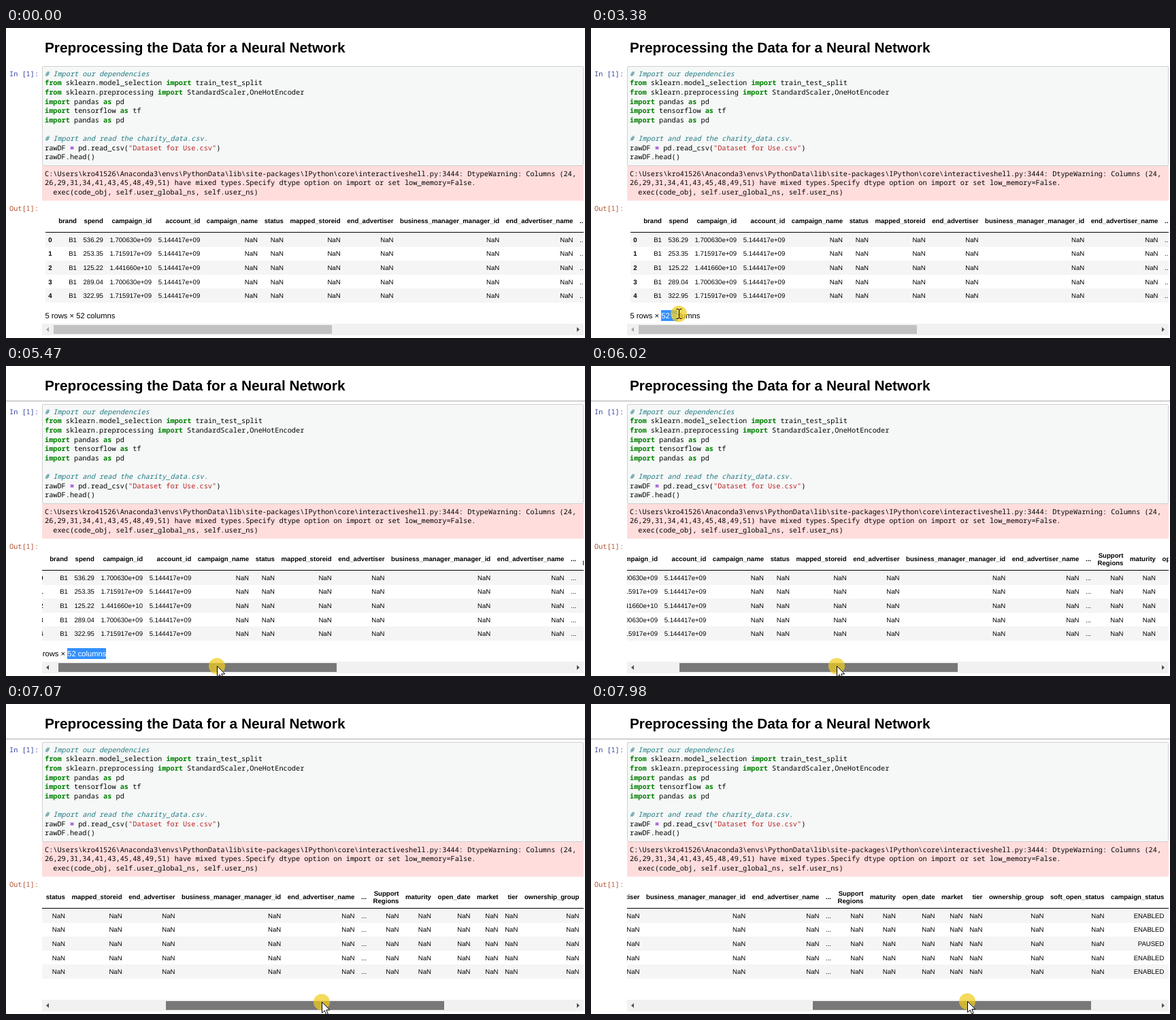
Write an HTML page that moves like this. It is 851 by 456 pixels and loops after 8 s.

```html
<!DOCTYPE html>
<html lang="en">
<head>
<meta charset="utf-8">
<title>Notebook</title>
<style>
@property --x { syntax: "<integer>"; inherits: true; initial-value: 545; }
@property --y { syntax: "<integer>"; inherits: true; initial-value: 450; }
@property --scroll { syntax: "<integer>"; inherits: true; initial-value: 0; }
@property --sel { syntax: "<integer>"; inherits: true; initial-value: 0; }

html, body { margin: 0; width: 100%; height: 100%; overflow: hidden; background: #fff; }
#stage {
  position: relative; width: 851px; height: 456px; overflow: hidden; background: #fff; color: #000;
  font-family: "Liberation Sans", Arial, sans-serif; text-rendering: geometricPrecision;
  animation: roam 8s step-end infinite, pick 8s step-end infinite;
}
#stage > *, #bar > *, #page > * { position: absolute; }
h1 { left: 57px; top: 18px; margin: 0; font-size: 20.8px; line-height: 23px; white-space: nowrap; }
pre { margin: 0; font: 10.263px/13.6px "Noto Sans Mono", "DejaVu Sans Mono", monospace; }
#rule { left: 0; top: 51px; width: 851px; height: 1px; background: #ababab; animation: rule 8s step-end infinite; }

.prompt { left: 5px; }
.in { top: 61.8px; color: #303f9f; }
.out { top: 260px; color: #b5502d; }
#code, #warn { left: 53px; width: 796px; box-sizing: border-box; }
#code { top: 56px; height: 147px; padding: 4.8px 3px; border: 1px solid #cfcfcf; border-radius: 2px; background: #f6f8f8; }
#code i { color: #217a80; }
#code b { color: #008000; }
#code s { color: #ba2121; text-decoration: none; }
#code u { color: #7800c2; font-weight: 700; text-decoration: none; }
#warn { top: 203px; height: 51px; padding: 5.8px 4px 0; background: #fdd; }

#view { left: 53px; top: 260px; width: 796px; height: 174px; overflow: hidden; }
#page { position: absolute; top: 0; left: calc(4.5px - var(--scroll) * 1px); width: 1483px; height: 174px; }
table { top: 8.4px; left: 0; width: max-content; border-spacing: 0; font-size: 9.6px; line-height: 11px; white-space: nowrap; }
th, td { padding: 5.8px 4.8px 3.8px; text-align: right; vertical-align: middle; }
thead th { padding: 5.4px 4.8px 4.2px; border-bottom: 1px solid #000; }
th:last-child, td:last-child { min-width: 127px; }
tbody tr:nth-child(odd) { background: #f5f5f5; }
#size { left: 0; top: 156px; margin: 0; font-size: 11.2px; line-height: 16px; white-space: nowrap; }
#size span { position: relative; }
#size span::after {
  content: attr(data-text); position: absolute; left: 0; top: -3px; height: 16px; line-height: 18px;
  width: calc(var(--sel) * 1px); overflow: hidden; background: #3390ff; color: #fff;
}

#bar { left: 53px; top: 435px; width: 796px; height: 17px; background: #f1f1f1; }
#thumb {
  left: calc(17px + var(--scroll) * .5138px); top: 2px; width: 409px; height: 13px;
  background: #c1c1c1; animation: thumb 8s step-end infinite;
}
.tip { top: 5px; width: 4px; height: 7px; background: #505050; }
.left { left: 6px; clip-path: polygon(100% 0, 100% 100%, 0 50%); animation: left 8s step-end infinite; }
.right { left: 786px; clip-path: polygon(0 0, 0 100%, 100% 50%); }

#pointer { left: calc(var(--x) * 1px); top: calc(var(--y) * 1px); width: 1px; height: 1px; overflow: visible; }
#ring { animation: ring 8s step-end infinite; }
#arrow { animation: arrow 8s step-end infinite; }
#beam { animation: beam 8s step-end infinite; }

@keyframes roam {
  0% { --x: 545; --y: 450; --scroll: 0; }
  11.625% { --x: 545; --y: 450; animation-timing-function: steps(4); }
  15.125% { --x: 330; --y: 441; animation-timing-function: steps(2); }
  16.875% { --x: 230; --y: 431; animation-timing-function: steps(5); }
  21.25% { --x: 124; --y: 424; }
  23.75% { --x: 121; --y: 423; animation-timing-function: steps(4); }
  27.25% { --x: 108; --y: 417; }
  31.375% { --x: 107; --y: 417; animation-timing-function: steps(2); }
  33.125% { --x: 105; --y: 418; }
  37.25% { --x: 102; --y: 417; }
  39.75% { --x: 110; --y: 418; animation-timing-function: steps(8); }
  46.75% { --x: 184; --y: 426; }
  50.875% { --x: 205; --y: 428; animation-timing-function: steps(4); }
  54.375% { --x: 288; --y: 434; }
  56% { --x: 295; --y: 438; animation-timing-function: steps(2); }
  57.625% { --x: 304; --y: 441; }
  68.375% { --x: 310; --y: 441; --scroll: 13; animation-timing-function: steps(2); }
  70.125% { --x: 324; --y: 441; --scroll: 42; }
  72.625% { --x: 331; --y: 441; --scroll: 54; animation-timing-function: steps(9); }
  80.5% { --x: 421; --y: 441; --scroll: 239; animation-timing-function: steps(2); }
  82.25% { --x: 433; --y: 441; --scroll: 262; }
  83.125% { --x: 435; --y: 440; --scroll: 266; animation-timing-function: steps(6); }
  88.375% { --x: 464; --y: 438; --scroll: 321; animation-timing-function: steps(5); }
  92.875% { --x: 497; --y: 438; --scroll: 385; }
  94.5% { --x: 503; --y: 438; --scroll: 397; animation-timing-function: steps(6); }
  99.75%, 100% { --x: 553; --y: 437; --scroll: 498; }
}
@keyframes pick {
  0% { --sel: 0; }
  39.75% { --sel: 7; animation-timing-function: steps(6); }
  45%, 100% { --sel: 57; }
}
@keyframes rule { 0% { opacity: 0; } 48.375%, 100% { opacity: 1; } }
@keyframes thumb {
  0%, 16.875% { background: #c1c1c1; }
  13.375%, 56% { background: #a8a8a8; }
  61.75%, 100% { background: #787878; }
}
@keyframes left { 0% { background: #a3a3a3; } 68.375%, 100% { background: #505050; } }
@keyframes ring { 0%, 46.75% { opacity: 0; } 37.25%, 61.75%, 100% { opacity: 1; } }
@keyframes arrow { 0%, 16.875% { opacity: 0; } 11.625%, 52.625%, 100% { opacity: 1; } }
@keyframes beam { 0%, 52.625%, 100% { opacity: 0; } 16.875% { opacity: 1; } }
</style>
</head>
<body>
<div id="stage">
  <h1>Preprocessing the Data for a Neural Network</h1>
  <div id="rule"></div>
  <pre class="prompt in">In [1]:</pre>
  <pre id="code"><i># Import our dependencies</i>
<b>from</b> sklearn.model_selection <b>import</b> train_test_split
<b>from</b> sklearn.preprocessing <b>import</b> StandardScaler,OneHotEncoder
<b>import</b> pandas <b>as</b> pd
<b>import</b> tensorflow <b>as</b> tf
<b>import</b> pandas <b>as</b> pd

<i># Import and read the charity_data.csv.</i>
rawDF <u>=</u> pd.read_csv(<s>"Dataset for Use.csv"</s>)
rawDF.head()</pre>
  <pre id="warn">C:\Users\kro41526\Anaconda3\envs\PythonData\lib\site-packages\IPython\core\interactiveshell.py:3444: DtypeWarning: Columns (24,
26,29,31,34,41,43,45,48,49,51) have mixed types.Specify dtype option on import or set low_memory=False.
  exec(code_obj, self.user_global_ns, self.user_ns)</pre>
  <pre class="prompt out">Out[1]:</pre>
  <div id="view">
    <div id="page">
      <table><thead></thead><tbody></tbody></table>
      <p id="size">5 rows × <span data-text="52 columns">52 columns</span></p>
    </div>
  </div>
  <div id="bar">
    <div class="tip left"></div>
    <div id="thumb"></div>
    <div class="tip right"></div>
  </div>
  <svg id="pointer">
    <circle id="ring" cy=".5" r="12" fill="#f0cd1e" fill-opacity=".72"/>
    <path id="arrow" d="M.5 .5V16.5L4.2 13L6.7 18.8L9.2 17.7L6.8 12H11.8Z" fill="#fff" stroke="#000"/>
    <path id="beam" d="M-3.5 -6.5H-1L.5 -5.5L2 -6.5H4.5M.5 -5.5V6.5M-3.5 7.5H-1L.5 6.5L2 7.5H4.5" fill="none" stroke="#000"/>
  </svg>
</div>
<script>
const heads = ["", "brand", "spend", "campaign_id", "account_id", "campaign_name", "status",
  "mapped_storeid", "end_advertiser", "business_manager_manager_id", "end_advertiser_name", "...",
  "Support<br>Regions", "maturity", "open_date", "market", "tier", "ownership_group",
  "soft_open_status", "campaign_status", ""];
const rows = [
  ["536.29", "1.700630e+09", "ENABLED"],
  ["253.35", "1.715917e+09", "ENABLED"],
  ["125.22", "1.441660e+10", "PAUSED"],
  ["289.04", "1.700630e+09", "ENABLED"],
  ["322.95", "1.715917e+09", "ENABLED"]
];
const cells = (tag, list) => list.map(s => `<${tag}>${s}</${tag}>`).join("");
const nans = n => Array(n).fill("NaN");

document.querySelector("thead").innerHTML = `<tr>${cells("th", heads)}</tr>`;
document.querySelector("tbody").innerHTML = rows.map(([spend, id, state], i) =>
  `<tr><th>${i}</th>${cells("td",
    ["B1", spend, id, "5.144417e+09", ...nans(6), "...", ...nans(7), state, ""])}</tr>`).join("");
</script>
</body>
</html>
```
